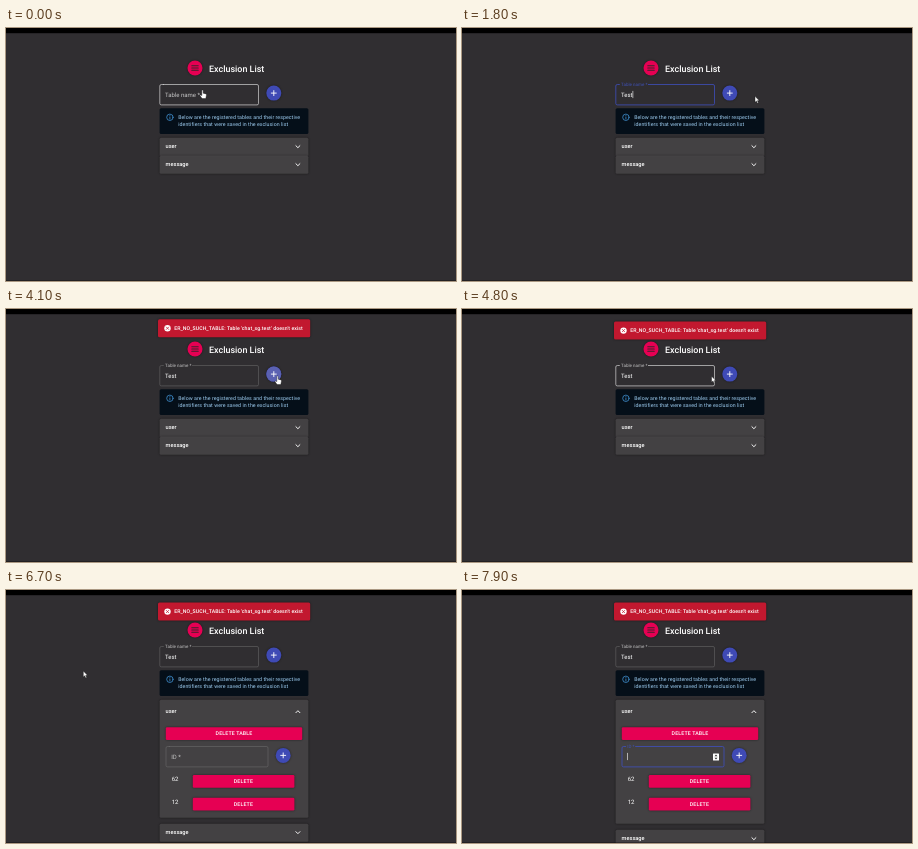
Recreate the animation shown at these times as an HTML page. Size 450 px wide and 253 px high, loop 8 s.

```html
<!DOCTYPE html>
<html lang="en">
<head>
<meta charset="utf-8">
<title>Exclusion List</title>
<style>
html, body { margin: 0; width: 100%; height: 100%; overflow: hidden; background: #302e31; }
svg { display: block; width: 100%; height: 100%; }
text { font-family: Roboto, Arial, sans-serif; font-size: 6px; fill: #fff; text-rendering: geometricPrecision; }
.title { font-size: 8.95px; font-weight: 500; }
.info { font-size: 5.25px; letter-spacing: .0107em; fill: #a0d0f5; }
.error { font-size: 5.18px; font-weight: 500; letter-spacing: .0107em; }
.head { font-size: 5.625px; font-weight: 500; }
.btn { font-size: 5.25px; font-weight: 500; letter-spacing: .0286em; text-anchor: middle; }
.line { fill: none; stroke: #fff; stroke-linecap: round; stroke-linejoin: round; }
.panel { fill: #434143; }
.pink { fill: #e60053; }
.blue { fill: #3f4ab5; }
.lift { filter: drop-shadow(0 .8px .8px #0007); }
</style>
</head>
<body>
<svg viewBox="0 0 450 253">
  <defs>
    <clipPath id="fold"><rect id="foldBox" x="150" y="100" width="160" height="0"/></clipPath>
    <path id="plus" class="line" stroke-width=".9" d="M-2.5 0H2.5M0-2.5V2.5"/>
    <path id="chevron" class="line" stroke-width=".95" d="M-2-1L0 1L2-1"/>
  </defs>
  <rect width="450" height="253" fill="#302e31"/>

  <circle class="pink lift" cx="189" cy="40" r="7.5"/>
  <path class="line" style="stroke:#40202b" stroke-width="1.1" d="M185.8 37.8H192.2M185.8 40H192.2M185.8 42.2H192.2"/>
  <text class="title" x="203" y="44.3">Exclusion List</text>

  <g id="nameField"></g>
  <g transform="translate(267.8 65.1)">
    <circle class="blue lift" r="7.5"/>
    <circle id="shade" r="7.5" fill="#2b339c"/>
    <circle id="ripple" fill="#fff"/>
    <use href="#plus"/>
  </g>

  <rect x="153.6" y="80.3" width="148.8" height="25.8" rx="1.5" fill="#050f19"/>
  <g class="line" style="stroke:#47a0e6" stroke-width=".7">
    <circle cx="163.9" cy="89.3" r="3.2"/><path d="M163.9 89V91M163.9 87.6V87.7"/>
  </g>
  <text class="info" x="172.2" y="90.8">Below are the registered tables and their respective</text>
  <text class="info" x="172.2" y="98.3">identifiers that were saved in the exclusion list</text>

  <rect id="userPanel" class="panel lift" x="153.6" y="109.7" width="148.8" rx="1.5"/>
  <text id="userText" class="head" x="159.6">user</text>
  <use id="userChevron" href="#chevron"/>
  <g clip-path="url(#fold)">
    <g id="details">
      <rect class="pink lift" x="159.8" y="137.2" width="136.4" height="12.8" rx="1.3"/>
      <text class="btn" x="228" y="145.3">DELETE TABLE</text>
      <g id="idField"></g>
      <g transform="translate(277.2 165.4)"><circle class="blue lift" r="7.5"/><use href="#plus"/></g>
      <text x="165.7" y="191.1">62</text>
      <rect class="pink lift" x="186.8" y="185" width="101.6" height="12.8" rx="1.3"/>
      <text class="btn" x="237.4" y="193.1">DELETE</text>
      <text x="165.7" y="213.8">12</text>
      <rect class="pink lift" x="186.8" y="207.7" width="101.6" height="12.8" rx="1.3"/>
      <text class="btn" x="237.4" y="215.8">DELETE</text>
      <g id="spinner">
        <rect x="251" y="163.4" width="6" height="7.2" rx=".5" fill="#fff"/>
        <path d="M252.5 166.2L254 164.5L255.5 166.2ZM252.5 167.8L254 169.5L255.5 167.8Z" fill="#333"/>
      </g>
    </g>
  </g>
  <g id="messagePanel">
    <rect class="panel lift" x="153.6" width="148.8" height="18" rx="1.5"/>
    <path id="divider" d="M153.6 0H302.4" stroke="#575557" stroke-width=".4"/>
    <text class="head" x="159.6" y="10.7">message</text>
    <use href="#chevron" x="291.9" y="9"/>
  </g>

  <g id="toast">
    <rect class="lift" x="152" y="12.6" width="152.2" height="18" rx="1.5" fill="#c2182f"/>
    <circle cx="161.5" cy="21.6" r="3.2" fill="#fff"/>
    <path class="line" style="stroke:#c2182f" stroke-width=".75" d="M160.3 20.4L162.7 22.8M162.7 20.4L160.3 22.8"/>
    <text class="error" x="168.2" y="23.3">ER_NO_SUCH_TABLE: Table 'chat_sg.test' doesn't exist</text>
  </g>

  <rect width="450" height="5.2"/>
  <rect y="252" width="450" height="1" opacity=".3"/>

  <g id="cursor" stroke-linejoin="round">
    <path id="arrow" d="M0 0V6L1.4 4.8L2.4 7L3.4 6.5L2.4 4.4L4.2 4.3Z" fill="#fff" stroke="#111" stroke-width=".4"/>
    <path id="hand" d="M-.7.6Q0-.6.7.6V3.2L3.5 3.9Q4.2 4.2 4 5L3.3 8.6H-.4L-2.6 5.6Q-2.5 4.5-.7 5.5Z" fill="#fff" stroke="#111" stroke-width=".4"/>
  </g>
</svg>
<script>
const $ = id => document.getElementById(id);
const set = (el, attrs) => { for (const k in attrs) el.setAttribute(k, attrs[k]); };
const show = (id, on) => { $(id).style.display = on ? '' : 'none'; };
const clamp = v => Math.max(0, Math.min(1, v));

function bezier(x1, y1, x2, y2) {
  const at = (a, b, s) => 3 * a * s * (1 - s) ** 2 + 3 * b * s * s * (1 - s) + s ** 3;
  return x => {
    let lo = 0, hi = 1;
    for (let i = 0; i < 20; i++) {
      const mid = (lo + hi) / 2;
      if (at(x1, x2, mid) < x) lo = mid; else hi = mid;
    }
    return at(y1, y2, lo);
  };
}
const easeInOut = bezier(.4, 0, .2, 1), easeOut = bezier(0, 0, .2, 1);
const tween = (t, start, length, ease) => ease(clamp((t - start) / length));

// Outlined input whose label floats up into a notch in the border.
function makeField(id, x, y, w, label, notch) {
  const h = 20.4, r = 1.5, right = x + w, bottom = y + h, base = y + 12.2, tx = x + 5.2;
  $(id).innerHTML = `<path class="line"/><text>${label}</text><text x="${tx}" y="${base}"></text>
    <path d="M0 ${base - 5.8}V${base + 1.4}" stroke="#fff" stroke-width=".6"/>`;
  const [border, tag, value, caret] = $(id).children;
  return ({ lift, focus, hover, text = '', caretOn }) => {
    const left = x + 3.6;
    set(border, {
      d: `M${left + notch * lift} ${y}H${right - r}a${r} ${r} 0 0 1 ${r} ${r}V${bottom - r}a${r} ${r} 0 0 1 ${-r} ${r}` +
         `H${x + r}a${r} ${r} 0 0 1 ${-r} ${-r}V${y + r}a${r} ${r} 0 0 1 ${r} ${-r}H${left}`,
      'stroke-width': focus ? .75 : hover ? .6 : .45
    });
    border.style.stroke = focus ? '#3f51c5' : hover ? '#eee' : '#777';
    tag.style.fill = focus ? '#3f51b5' : '#c4c4c4';
    set(tag, { transform: `translate(${tx} ${base - 10.9 * lift}) scale(${1 - .25 * lift})` });
    value.textContent = text;
    const end = text ? value.getComputedTextLength() : 0;
    set(caret, { transform: `translate(${tx + end + .3} 0)` });
    caret.style.display = caretOn ? '' : 'none';
  };
}
const nameField = makeField('nameField', 153.8, 56.5, 98.7, 'Table name *', 29);
const idField = makeField('idField', 160, 156.5, 102, 'ID *', 10);

// Pointer stops: time, x, y
const stops = [
  [0, 196.5, 62], [200, 198, 63], [900, 289, 68], [1300, 291, 70], [1800, 293, 68.3],
  [2400, 292, 69], [2700, 288, 71], [2900, 283.7, 71], [3500, 272, 67.5], [4100, 271.5, 67],
  [4450, 271.5, 67], [5200, 223, 67.5], [5850, 223, 67.5], [5900, 221.2, 70], [6300, 212, 117],
  [6450, 212, 117], [6700, 77.3, 81], [6950, 20, 88], [7300, 190, 166]
];
function pointerAt(t) {
  const i = stops.findIndex(s => s[0] > t);
  if (i < 0) return stops[stops.length - 1].slice(1);
  const a = stops[i - 1], b = stops[i], p = (t - a[0]) / (b[0] - a[0]), e = p * p * (3 - 2 * p);
  return [a[1] + (b[1] - a[1]) * e, a[2] + (b[2] - a[2]) * e];
}

const CLICK = 150, KEYS = [900, 1150, 1400, 1620], HOVER = 2720, ADD = 3870, LEAVE = 4450;
const TOAST = 3960, OPEN = 6490, ID = 7390;
const blink = (t, since) => (t - since) % 1060 < 530;

function draw(t) {
  const [px, py] = pointerAt(t);
  const typed = KEYS.filter(k => k <= t);
  const focus = t >= CLICK && t < ADD;
  nameField({
    lift: tween(t, CLICK, 200, easeOut), focus,
    hover: px > 153 && px < 253 && py > 56 && py < 77,
    text: 'Test'.slice(0, typed.length),
    caretOn: focus && blink(t, typed.length ? typed[typed.length - 1] : CLICK)
  });

  const wave = tween(t, ADD, 250, easeOut), stay = 1 - tween(t, LEAVE, 250, easeInOut);
  set($('shade'), { opacity: tween(t, HOVER, 250, easeInOut) * stay });
  set($('ripple'), { r: 7.5 * wave, opacity: .23 * wave * stay });

  set($('toast'), { transform: `translate(0 ${-28 * (1 - tween(t, TOAST, 225, easeOut))})` });
  show('toast', t >= TOAST);

  const grow = tween(t, OPEN, 300, easeInOut), head = tween(t, OPEN, 150, easeInOut);
  const top = 109.7, headH = 18 + 6 * head, bodyH = 100 * grow, mid = top + headH / 2;
  set($('userPanel'), { height: headH + bodyH });
  set($('userText'), { y: mid + 1.7 });
  set($('userChevron'), { transform: `translate(291.9 ${mid}) rotate(${180 * head})` });
  set($('foldBox'), { y: top + headH, height: bodyH });
  set($('details'), { transform: `translate(0 ${headH - 24})` });
  set($('messagePanel'), { transform: `translate(0 ${top + headH + bodyH + 6 * head})` });
  set($('divider'), { opacity: 1 - head });

  const overId = t > OPEN + 300 && px > 160 && px < 262 && py > 156 && py < 177;
  idField({ lift: tween(t, ID, 200, easeOut), focus: t >= ID, hover: overId, caretOn: t >= ID && blink(t, ID) });
  show('spinner', overId);

  const hand = t < 300 || (t > 3450 && t < 4600) || (t > 6250 && t < 6520);
  show('cursor', t < 7300);
  show('hand', hand);
  show('arrow', !hand);
  set($('cursor'), { transform: `translate(${px} ${py})` });
}

const begin = performance.now();
function tick() {
  draw((performance.now() - begin) % 8000);
  requestAnimationFrame(tick);
}
tick();
</script>
</body>
</html>
```
